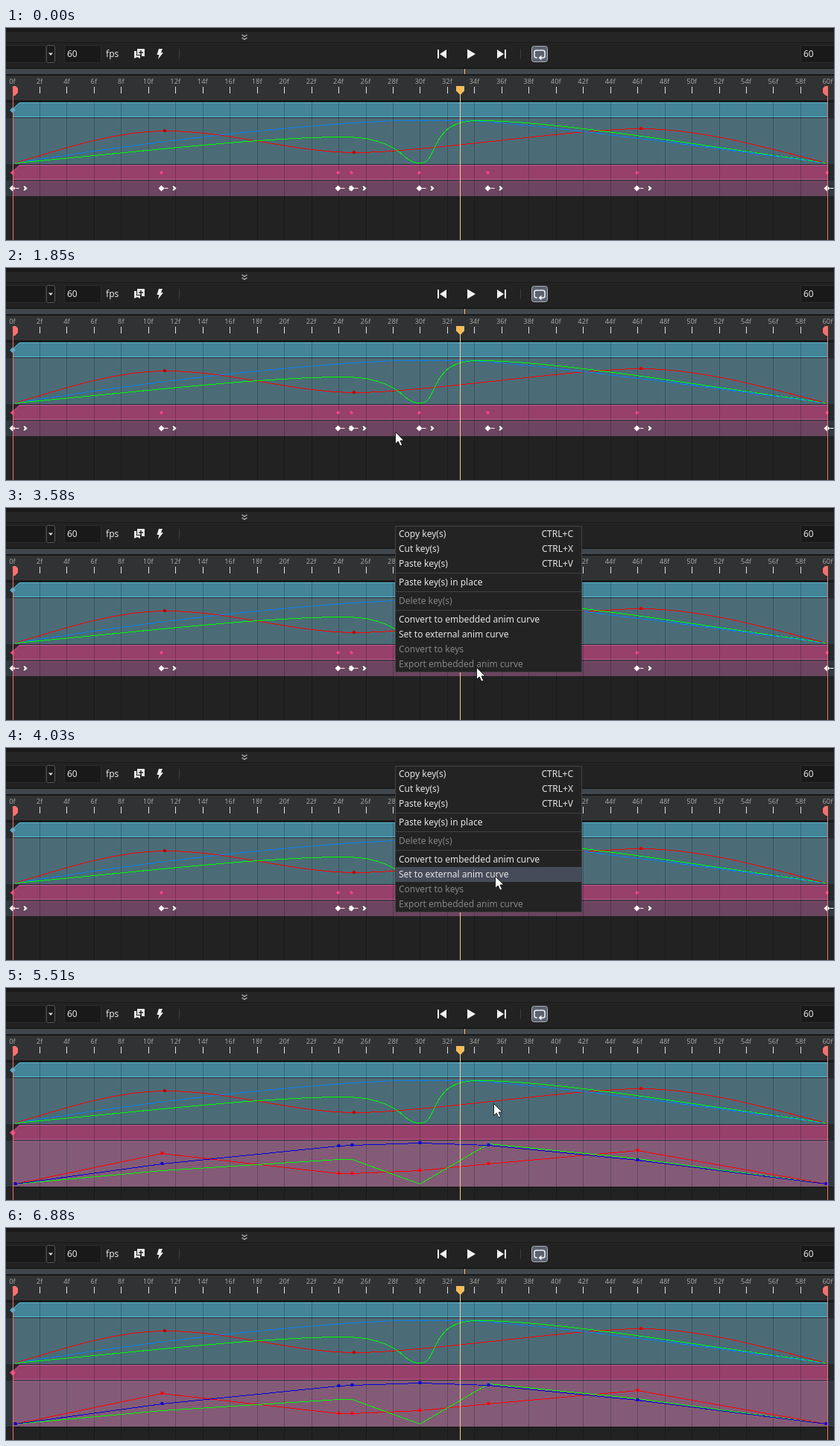
Write an HTML page that moves like this. It is 1111x285 px and loops after 8910 ms.

```html
<!DOCTYPE html>
<html>
<head>
<meta charset="utf-8">
<style>
  html, body { margin: 0; width: 100%; height: 100%; overflow: hidden; background: #222; }
  svg { display: block; }
  text { font: 12px "Noto Sans", "Open Sans", sans-serif; fill: #e6e6e6; }
  .ruler text { font-size: 9.33px; fill: #a2a2a2; text-anchor: middle; }
  .curve { fill: none; shape-rendering: crispEdges; transform: translate(.5px, .5px); }
  .off { fill: #858585; }
</style>
</head>
<body>
<svg id="stage" width="1111" height="285" viewBox="0 0 1111 285"></svg>
<script>
const LOOP = 8910;
const RED = '#f00', GREEN = '#0f0', BLUE = '#0084ff', NAVY = '#0000d8';
const MARK = '#f87070', HEAD = '#f7bd5c', OUTSIDE = '#2d383f';
const keys = [0, 11, 24, 25, 30, 35, 46, 60];

const frameX = f => 8.5 + 18.232 * f;
const rect = (x, y, w, h, fill, extra = '') =>
  `<rect x="${x}" y="${y}" width="${w}" height="${h}" fill="${fill}" ${extra}/>`;
const path = (d, fill, extra = '') => `<path d="${d}" fill="${fill}" ${extra}/>`;
const line = (d, color, width = 1, extra = '') =>
  path(d, 'none', `stroke="${color}" stroke-width="${width}" ${extra}`);
const text = (x, y, s, extra = '') => `<text x="${x}" y="${y}" ${extra}>${s}</text>`;
const curve = (d, color, extra = '') => line(d, color, 1, `class="curve" ${extra}`);
const diamond = (x, y, r, color) =>
  path(`M${x - r} ${y}l${r} ${-r}l${r} ${r}l${-r} ${r}z`, color);
const dot = (x, y, color) => rect(x - 1.5, y - 1.5, 4, 4, color, 'rx="1"');
const evens = fn => Array.from({ length: 31 }, (_, i) => fn(2 * i)).join('');

function toolbar() {
  const separator = x => rect(x, 28, 1, 14, '#3c3c3c');
  return rect(0, 0, 1111, 5, '#191919') + rect(0, 5, 1111, 14, '#252525') +
    rect(0, 19, 1111, 1, '#191919') + rect(0, 20, 1111, 33, '#222') +
    line('M316.5 9l3.5 2.5l3.5-2.5M316.5 13l3.5 2.5l3.5-2.5', '#bdbdbd', 1.2) +
    rect(-5, 23.5, 58, 23, '#191919', 'rx="2" stroke="#2c2c2c"') +
    rect(54.5, 23.5, 11, 23, '#1b1b1b', 'rx="2" stroke="#555"') +
    path('M57 33.5h6l-3 3.5z', '#ddd') +
    rect(78.5, 23.5, 49, 23, '#191919', 'rx="2" stroke="#2c2c2c"') +
    text(82, 39, '60') + text(134, 39, 'fps') +
    path('M176 28h10v10h-4v-2h-6zM172 31h3v6h5v4l-4-2l-4 2z', '#e8e8e8') +
    line('M181 30v6M178 33h6', '#222', 1.5) +
    path('M205 28h5l-2 5h3l-7 9l1.500-6h-3z', '#f0f0f0') +
    separator(232) + separator(690) +
    path('M579 29h2v12h-2zM591 29v12l-9-6zM619 28.500l11 6.500l-11 6.500zM659 29l9 6l-9 6zM669 29h2v12h-2z', '#f4f4f4') +
    rect(705.5, 24.5, 21, 21, '#5b6270', 'rx="3" stroke="#a9adb5"') +
    line('M713 40h-1.500q-2.500 0-2.500-2.500v-5q0-2.500 2.500-2.500h9q2.500 0 2.500 2.500v5q0 2.500-2.500 2.500h-3', '#f2f2f2', 1.5) +
    path('M718.500 36.500v7l-4-3.500z', '#f2f2f2') +
    rect(1066.5, 23.5, 50, 23, '#191919', 'rx="2" stroke="#2c2c2c"') + text(1070, 39, '60');
}

function ruler() {
  return rect(0, 53, 1111, 11, '#181818') + rect(0, 55, 1111, 7, '#42464d') +
    rect(615, 55, 1, 7, HEAD) +
    rect(0, 64, 1111, 33, '#313233') + rect(0, 97, 1111, 3, '#1b1b1b') +
    '<g class="ruler">' + evens(f => {
      const x = frameX(f);
      return text(x, 75, f + 'f') + rect(Math.round(x), 79, 1, 9, '#e2e2e2');
    }) + '</g>';
}

// A track body covers the time range only; a slate strip shows on both sides.
const body = (y, h, fill) => rect(0, y, 1111, h, OUTSIDE) + rect(9, y, 1094, h, fill);

function header(y, fill, border) {
  return rect(0, y, 1111, 20, '#24282b') +
    path(`M9.500 ${y + 19.5}v-11l8.500-8h1084.500v19z`, fill, `stroke="${border}"`);
}

const grid = bottom => evens(f =>
  rect(Math.round(frameX(f)), 100, 1, bottom - 100, '#000', 'opacity=".22"'));

function upperCurves() {
  return curve('M12 181C80 160 150 138 213 138C300 138 380 166 467 167C560 167 760 135 852 135C930 135 1020 160 1100 181', RED) +
    curve('M12 181C190 153 360 132 520 124H620C720 130 850 148 1100 181', BLUE, 'stroke-dasharray="14 2"') +
    curve('M12 181C160 168 340 146 454 146C495 146 517 157 532 170C542 180 548 181 556 181C580 181 566 124 632 124C700 124 800 138 860 146L1100 181', GREEN) +
    curve('M850 146L1100 181', BLUE, 'stroke-dasharray="4 5"') +
    dot(212.5, 137.5, '#b00') + dot(466.5, 166.5, '#b00') + dot(851.5, 134.5, '#d00');
}

function keyRow() {
  return body(205, 21, '#6c4560') + grid(285) + keys.map(f => {
    const x = Math.round(frameX(f)) - .5;
    return diamond(x, 194.5, 2.7, '#f0448c') +
      line(`M${x + 4} 215.500h5`, '#fff') +
      path(`M${x + 14} 212l3 0l3.500 3.500l-3.500 3.500h-3l2-3.500z`, '#fff', 'stroke="#333" stroke-width=".8"') +
      diamond(x, 215.5, 4, '#fff');
  }).join('');
}

function lowerCurves() {
  const series = [
    [RED, [263, 222, 249, 249, 245, 236, 218, 263]],
    [GREEN, [263, 245, 230, 230, 263, 209, 229, 263]],
    [NAVY, [263, 236, 212, 211, 208, 211, 231, 263]]
  ];
  const keyX = i => i == 0 ? 12 : i == 7 ? 1100 : Math.round(frameX(keys[i]));
  return body(205, 62, '#835b77') + rect(0, 267, 1111, 1, '#191919') + grid(285) +
    diamond(9, 194.5, 4, '#e84788') +
    series.map(([color, ys]) =>
      curve('M' + ys.map((y, i) => keyX(i) + ' ' + y).join('L'), color) +
      (color == GREEN ? '' : ys.map((y, i) => dot(keyX(i), y - .5, color)).join(''))
    ).join('');
}

function markers() {
  return rect(9, 88, 1, 197, MARK) + path('M9 78h4l3 3v6l-4 4h-3z', MARK) +
    rect(1102, 88, 1, 197, MARK) + path('M1103 78h-4l-3 3v6l4 4h3z', MARK) +
    rect(609, 88, 1, 197, '#f9cd84') + path('M604 78h11v6.500l-5.500 5.500l-5.500-5.500z', HEAD);
}

function menu() {
  const items = [
    [35, 'Copy key(s)', 'CTRL+C'], [55, 'Cut key(s)', 'CTRL+X'], [75, 'Paste key(s)', 'CTRL+V'],
    [100, 'Paste key(s) in place'], [125, 'Delete key(s)', '', 1],
    [150, 'Convert to embedded anim curve'], [170, 'Set to external anim curve'],
    [190, 'Convert to keys', '', 1], [210, 'Export embedded anim curve', '', 1]
  ];
  return rect(522.5, 24.5, 250, 196, '#232323', 'stroke="#434343"') +
    rect(523, 140, 249, 20, '#464b59', 'id="hover"') +
    [87, 112, 137].map(y => rect(523, y, 249, 1, '#414141')).join('') +
    items.map(([y, label, shortcut, off]) =>
      text(527, y + 4, label, off ? 'class="off"' : '') +
      (shortcut ? text(761, y + 4, shortcut, 'text-anchor="end"') : '')).join('');
}

const group = (id, content) => `<g id="${id}">${content}</g>`;
document.getElementById('stage').innerHTML =
  toolbar() + ruler() +
  body(121, 63, '#4b6c77') +
  header(100, '#438499', '#5cc0d8') + header(184, '#96406a', '#cb6098') +
  [120, 183, 204].map(y => rect(0, y, 1111, 1, '#22262a')).join('') +
  diamond(9, 110.5, 4, '#3db5d6') +
  group('before', keyRow()) + group('after', lowerCurves()) +
  upperCurves() + markers() + group('menu', menu()) +
  group('cursor', path('M.5 .5v16l3.700-3.400l2.700 6l2.800-1.200l-2.700-5.900h5z', '#fff', 'stroke="#111" stroke-width=".9"'));

const track = [
  [1220, 510, 283], [1850, 522, 220], [3130, 522, 220], [3580, 631, 214],
  [4030, 656, 172], [4120, 656, 158], [4390, 654, 155], [6430, 654, 155], [6790, 864, 239]
];

// The pointer advances in 90 ms steps that land on each waypoint.
function pointer(t) {
  const i = track.findIndex(p => p[0] > t);
  if (i < 0) return track[track.length - 1].slice(1);
  if (i == 0) return track[0].slice(1);
  const [t0, x0, y0] = track[i - 1], [t1, x1, y1] = track[i];
  const step = Math.max(t0, t1 - Math.ceil((t1 - t) / 90) * 90);
  const k = (step - t0) / (t1 - t0);
  return [Math.round(x0 + (x1 - x0) * k), Math.round(y0 + (y1 - y0) * k)];
}

const el = id => document.getElementById(id);
const show = (id, on) => { el(id).style.display = on ? '' : 'none'; };

function draw(now) {
  const t = now % LOOP, [x, y] = pointer(t);
  show('before', t < 5510);
  show('after', t >= 5510);
  show('menu', t >= 2320 && t < 5510);
  show('cursor', t >= 1220 && t < 6880);
  show('hover', y >= 140 && y < 180);
  el('hover').setAttribute('y', y < 160 ? 140 : 160);
  el('cursor').setAttribute('transform', `translate(${x} ${y})`);
}

const start = performance.now();
function tick() {
  draw(performance.now() - start);
  requestAnimationFrame(tick);
}
tick();
</script>
</body>
</html>
```
